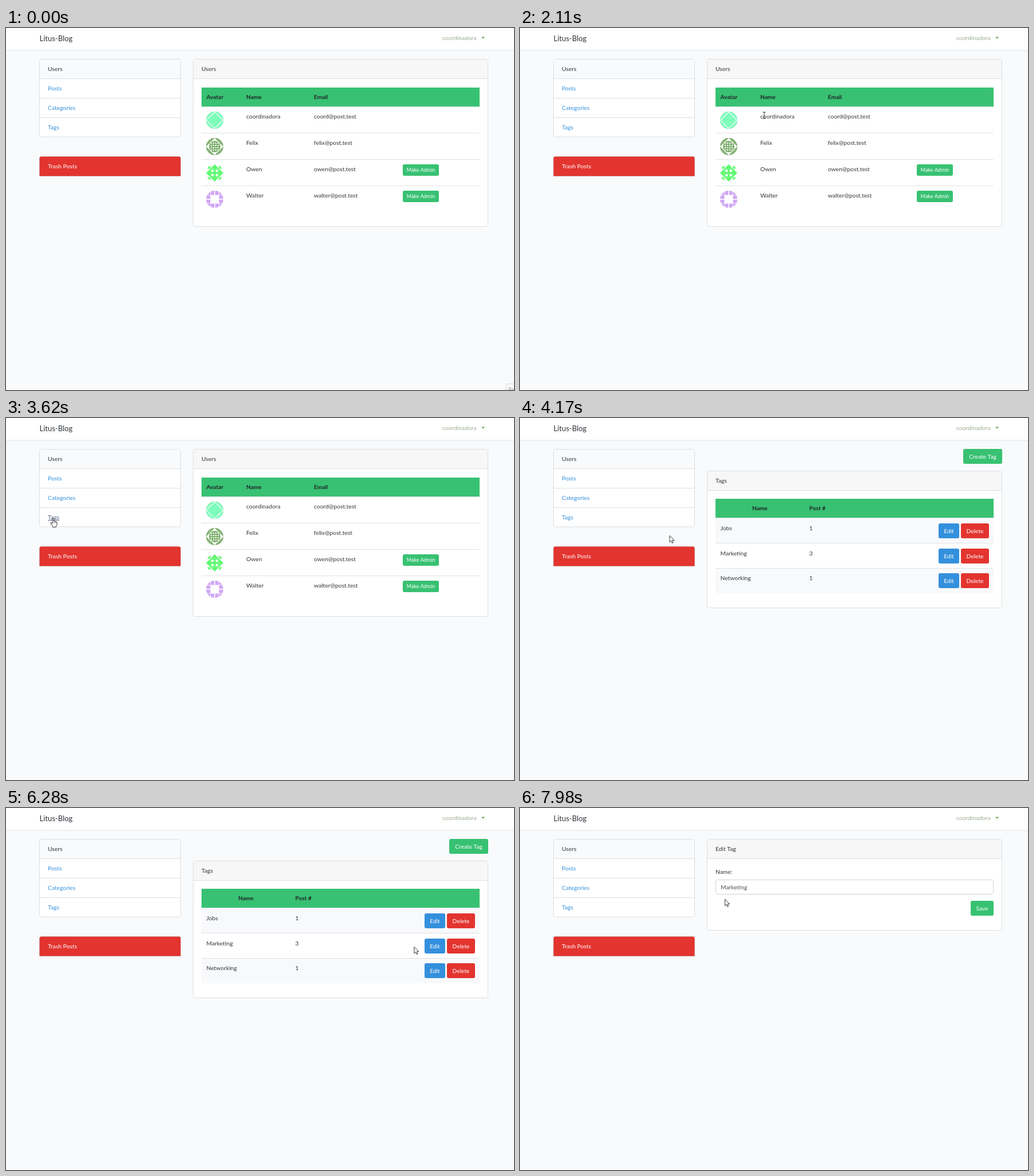
An HTML page with a canvas that plays this animation: 886 by 632 pixels, repeating every 8 s.

```html
<!DOCTYPE html>
<html lang="en">
<head>
<meta charset="utf-8">
<title>Blog admin</title>
<style>
html, body { margin: 0; width: 100%; height: 100%; overflow: hidden; background: #f8fafc; }
canvas { display: block; }
</style>
</head>
<body>
<canvas id="stage" width="886" height="632"></canvas>
<script>
const ctx = document.getElementById('stage').getContext('2d');
const LOOP = 8000, STEP = 68.2;
const TAGS_AT = 3880, EDIT_AT = 7770;
const SWAY_FROM = 4560, SWAY_TO = 7320;
const GREEN = '#38c172', RED = '#e3342f', BLUE = '#3490dc';
const INK = '#32373c', DARK = '#212529', LINE = '#dee2e6', EDGE = '#dcdee0';

const users = [
  ['coordinadora', 'coord@post.test'],
  ['Felix', 'felix@post.test'],
  ['Owen', 'owen@post.test'],
  ['Walter', 'walter@post.test']
];
const tags = [['Jobs', '1'], ['Marketing', '3'], ['Networking', '1']];

let textBoxes = [];

// idle pointer: swings left and right over the tag rows
function sway(t) {
  return [590 + 135 * Math.cos((t - 5488) * .008563), 241 + 5 * Math.sin((t - 5430) / 130)];
}

// turning points and stops of the pointer: ms, x, y
const path = [
  [204, 872, 622],
  [750, 459, 118],
  [1300, 650, 272],
  [1570, 518, 190],
  [1800, 585, 262],
  [2114, 426, 152],
  [2250, 354, 176],
  [2592, 612, 278],
  [3410, 128, 146],
  [3600, 82, 175],
  [TAGS_AT, 82, 175],
  [4160, 260.5, 205],
  [SWAY_FROM, ...sway(SWAY_FROM)],
  [SWAY_TO, ...sway(SWAY_TO)],
  [7640, 742, 241],
  [7710, 742, 241],
  [7975, 357, 159]
];

function slope(i, k) {
  const a = path[i], b = path[i + 1];
  return a && b ? (b[k] - a[k]) / (b[0] - a[0]) : 0;
}

// monotone tangent, so turning points are never overshot
function tangent(i, k) {
  const a = slope(i - 1, k), b = slope(i, k);
  return a * b > 0 ? 2 * a * b / (a + b) : 0;
}

function pointerAt(t) {
  if (t < path[0][0]) return null;
  if (t >= SWAY_FROM && t < SWAY_TO) return sway(t);
  const next = path.findIndex(p => p[0] > t);
  if (next < 0) return path[path.length - 1].slice(1);
  const i = next - 1, a = path[i], b = path[next], d = b[0] - a[0];
  const u = (t - a[0]) / d, ease = u * u * (3 - 2 * u);
  return [1, 2].map(k =>
    a[k] + (b[k] - a[k]) * ease +
    d * u * (1 - u) * ((1 - u) * tangent(i, k) - u * tangent(next, k)));
}

function rect(x, y, w, h, color) {
  ctx.fillStyle = color;
  ctx.fillRect(x, y, w, h);
}

function round(x, y, w, h, r, fill, stroke) {
  ctx.beginPath();
  ctx.roundRect(x, y, w, h, r);
  ctx.fillStyle = fill;
  ctx.fill();
  if (stroke) {
    ctx.strokeStyle = stroke;
    ctx.lineWidth = 1;
    ctx.stroke();
  }
}

function text(s, x, y, { color = INK, size = 10.3, weight = 400, align = 'left' } = {}) {
  ctx.font = `${weight} ${size}px Lato, "Open Sans", sans-serif`;
  ctx.textAlign = align;
  ctx.fillStyle = color;
  ctx.fillText(s, x, y);
  const w = ctx.measureText(s).width;
  if (align === 'left') textBoxes.push([x, y - 10, w, 14]);
  return w;
}

function button(s, x, y, w, h, color, size = 10.2) {
  round(x, y, w, h, 3, color);
  text(s, x + w / 2, y + h / 2 + size * .35, { color: '#fff', size, align: 'center' });
}

function card(title, y, bottom) {
  round(326.5, y + .5, 514, bottom - y, 3, '#fff', EDGE);
  round(327, y + 1, 513, 33, [2, 2, 0, 0], '#f7f7f7');
  rect(327, y + 34, 513, 1, EDGE);
  text(title, 341, y + 21);
}

function tableHead(y, cells) {
  rect(341, y, 485, 33, GREEN);
  rect(341, y + 33, 485, 1, LINE);
  cells.forEach(([s, x]) => text(s, x, y + 20, { weight: 700, size: 10.1, color: DARK }));
}

function fillPath(draw) {
  ctx.beginPath();
  draw();
  ctx.closePath();
  ctx.fill();
}

function poly(points) {
  fillPath(() => points.forEach(p => ctx.lineTo(...p)));
}

function diamond(x, y, r) {
  poly([[x, y - r], [x + r, y], [x, y + r], [x - r, y]]);
}

// avatar cells, drawn in a square from the outer corner inwards
const CELL = 7.5;
const wedge = () => poly([[0, 0], [CELL, 0], [0, CELL]]);
const slant = () => poly([[CELL, 0], [CELL, CELL], [0, CELL]]);
const block = () => ctx.fillRect(.8, 0, CELL - 1.6, CELL);

function dots(n, gap, r) {
  ctx.fillStyle = '#fff';
  for (let i = 0; i < n * n; i++)
    diamond((i % n - (n - 1) / 2) * gap, (Math.floor(i / n) - (n - 1) / 2) * gap, r);
}

const avatars = [
  { color: '#7dfcbb', edge: wedge, corner: slant, core: () => diamond(0, 0, 13.5) },
  { color: '#7bad6a', edge: wedge, corner: slant, core() {
    fillPath(() => ctx.arc(0, 0, 10, 0, 7));
    dots(4, 4, 1.6);
  } },
  { color: '#5efa70', edge: slant, corner: slant, core() {
    ctx.fillRect(-CELL, -CELL, 2 * CELL, 2 * CELL);
    dots(2, CELL, 2.8);
  } },
  { color: '#d0a6f4', edge: block, corner: slant, core() {} }
];

function avatar({ color, edge, corner, core }, x, y) {
  const cell = (draw, cx, flip) => {
    ctx.save();
    ctx.translate(cx, -2 * CELL);
    ctx.scale(flip, 1);
    draw();
    ctx.restore();
  };
  ctx.save();
  ctx.translate(x, y);
  fillPath(() => ctx.arc(0, 0, 15, 0, 7));
  ctx.clip();
  rect(-15, -15, 30, 30, '#fff');
  ctx.fillStyle = color;
  for (let i = 0; i < 4; i++) {
    cell(corner, -2 * CELL, 1);
    cell(edge, -CELL, 1);
    cell(edge, CELL, -1);
    ctx.rotate(Math.PI / 2);
  }
  core();
  ctx.restore();
}

function frame(hoverTags) {
  rect(0, 0, 886, 632, '#f8fafc');
  ['#eceef0', '#f1f3f5', '#f5f7f9'].forEach((c, i) => rect(0, 38 + i, 886, 1, c));
  rect(0, 0, 886, 38, '#fff');
  text('Litus-Blog', 58.5, 22.5, { size: 13 });
  text('coordinadora', 761, 21.3, { color: '#9bab91' });
  ctx.fillStyle = '#7fb06c';
  poly([[829, 15.5], [835.4, 15.5], [832.2, 19]]);

  round(58.5, 54.5, 246, 135.5, 3, '#fff', EDGE);
  rect(59, 55, 245, 33, '#f8fafc');
  text('Users', 73, 75);
  ['Posts', 'Categories', 'Tags'].forEach((s, i) => {
    const y = 88 + i * 34, hover = hoverTags && s === 'Tags';
    const color = hover ? '#4f6480' : BLUE;
    rect(59, y, 245, 1, EDGE);
    const w = text(s, 73, y + 21, { color });
    if (hover) rect(73, y + 22, w, 1, color);
  });
  round(58.5, 224.5, 246, 34, [3, 3, 0, 0], RED, 'rgba(0,0,0,.125)');
  text('Trash Posts', 73, 245, { color: '#fff' });
}

function usersPage() {
  card('Users', 54, 346);
  tableHead(104, [['Avatar', 349.5], ['Name', 419], ['Email', 537]]);
  users.forEach(([name, mail], i) => {
    const y = 137 + i * 46;
    if (i) rect(341, y, 485, 1, LINE);
    avatar(avatars[i], 364, y + 24);
    text(name, 419, y + 21);
    text(mail, 537, y + 21);
    if (i > 1) button('Make Admin', 692, y + 9, 63, 20, GREEN, 9);
  });
}

function tagsPage(hoverEdit) {
  button('Create Tag', 773, 54, 68, 26, GREEN);
  card('Tags', 92, 331);
  tableHead(141, [['Name', 405], ['Post #', 504.5]]);
  tags.forEach(([name, count], i) => {
    const y = 175 + i * 43.7, by = Math.round(y + 9);
    rect(341, y, 485, 43.7, i % 2 ? '#fff' : '#f8f9fb');
    if (i) rect(341, Math.floor(y), 485, 1, LINE);
    text(name, 349.5, y + 20.8);
    text(count, 504.5, y + 20.8);
    button('Edit', 730, by, 36, 26, hoverEdit && i === 1 ? '#227dc7' : BLUE);
    button('Delete', 769, by, 49, 26, RED);
  });
}

function editPage() {
  card('Edit Tag', 54, 213);
  text('Name:', 341, 114.7);
  round(341.5, 125.5, 484, 25, 3, '#fff', '#ced4da');
  text('Marketing', 350, 142, { color: '#495057' });
  button('Save', 786, 162, 40, 26, GREEN);
}

function outlined(d) {
  const p = new Path2D(d);
  ctx.fillStyle = '#fff';
  ctx.fill(p);
  ctx.strokeStyle = '#222';
  ctx.lineWidth = .9;
  ctx.stroke(p);
}

const cursors = {
  arrow() {
    outlined('M.4 .4v11.4l2.6-2.4 1.8 4 1.8-.8-1.7-3.9 3.5-.2z');
  },
  hand() {
    outlined('M-1 .5q1-1.4 2 0v4.5h2l.4.7h1.6l.4.8 1.2.2.4 1.3v3l-1.5 2.5v2h-6l-.2-2-3.3-4v-1.5l1.2-.2 1.8 1.7z');
    for (let x = 1; x < 6; x += 2) rect(x, 6, .6, 2.5, '#222');
  },
  beam() {
    rect(-.5, -5, 1, 11, '#333');
    [-5.5, 5.5].forEach(y => rect(-2.5, y, 5, 1, '#333'));
  }
};

function inside([x, y], [bx, by, w, h]) {
  return x >= bx && x < bx + w && y >= by && y < by + h;
}

function render(now) {
  const t = Math.floor(now / STEP + .1) * STEP;
  const p = pointerAt(t);
  const page = t < TAGS_AT ? 'users' : t < EDIT_AT ? 'tags' : 'edit';
  const onTags = p && page === 'users' && inside(p, [73, 166, 22, 15]);
  const onEdit = p && page === 'tags' && inside(p, [730, 228, 36, 26]);
  textBoxes = [];
  frame(onTags);
  if (page === 'users') usersPage();
  else if (page === 'tags') tagsPage(onEdit);
  else editPage();

  if (t < STEP) {
    round(872.5, 621.5, 30, 20, 0, '#fff', '#d0d3d6');
    text('Re', 876, 634, { color: '#999', size: 9 });
  }
  if (p) {
    const kind = onTags || onEdit ? 'hand' : textBoxes.some(b => inside(p, b)) ? 'beam' : 'arrow';
    ctx.save();
    ctx.translate(...p);
    cursors[kind]();
    ctx.restore();
  }
}

function tick() {
  render(performance.now() % LOOP);
  requestAnimationFrame(tick);
}
tick();
</script>
</body>
</html>
```
